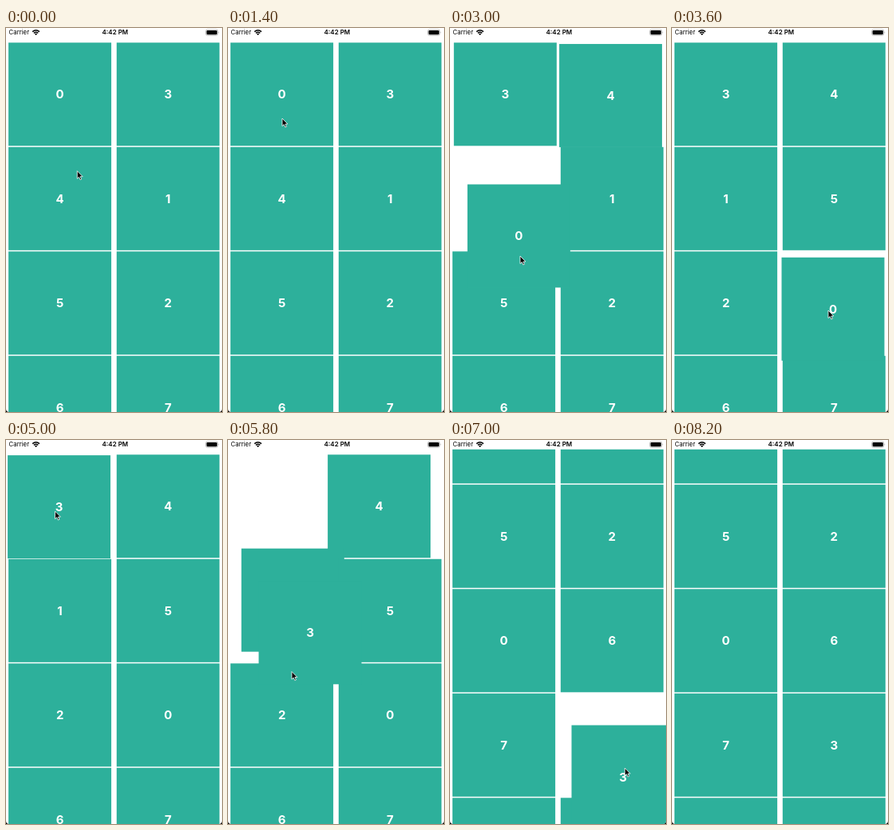
An HTML page that plays this animation: 271x480 px, repeating every 8300 ms.

```html
<!DOCTYPE html>
<html lang="en">
<head>
<meta charset="utf-8">
<title>Reorderable grid</title>
<style>
  html, body { margin: 0; width: 100%; height: 100%; overflow: hidden; background: #000; }
  svg { display: block; width: 100%; height: 100%; font-family: Inter, "Open Sans", sans-serif; }
  .cell rect { fill: #2db09b; }
  .cell text { fill: #fff; font-size: 15px; font-weight: 700; text-anchor: middle; }
  .carrier { font-size: 7.8px; }
  .clock { font-size: 8px; font-weight: 600; text-anchor: middle; }
  .arc { fill: none; stroke: #000; stroke-width: 1.4; }
</style>
</head>
<body>
<svg viewBox="0 0 271 480">
  <defs>
    <clipPath id="screen"><path d="M0 0H271V476Q271 480 267 480H4Q0 480 0 476Z"/></clipPath>
    <clipPath id="list"><rect y="11.7" width="271" height="469"/></clipPath>
  </defs>
  <g clip-path="url(#screen)">
    <rect width="271" height="480" fill="#fff"/>
    <g id="grid" clip-path="url(#list)"></g>
    <text class="carrier" x="3.6" y="8.4">Carrier</text>
    <path class="arc" d="M33.2 4.6Q37.6 .9 42 4.6M34.9 6.4Q37.6 4.2 40.3 6.4"/>
    <path d="M36 7.4Q37.6 6.2 39.2 7.4L37.6 9Z"/>
    <text class="clock" x="136.8" y="8.4">4:42 PM</text>
    <rect x="250.6" y="2" width="15.2" height="7.2" rx="2" fill="none" stroke="#999" stroke-width=".6"/>
    <rect x="251.6" y="2.9" width="13.2" height="5.4" rx="1.3"/>
    <path d="M266.6 4.5Q267.9 5.6 266.6 6.7Z" fill="#888"/>
    <path id="cursor" d="M0 0V9.6L2.2 7.6L3.8 11L5.4 10.3L3.9 7H6.9Z" stroke="#fff" stroke-width=".8"/>
  </g>
</svg>
<script>
const LOOP = 8300, STEP = 100, SHIFT = 300, LAG = 100;
const SIZE = 129, ROW = 130.5, COL = 135.7;
const LEFT = 67.6, TOP = 82.8;
const grid = document.getElementById('grid');
const cursor = document.getElementById('cursor');

// Key points of the hand: [time, x, y]
const path = [
  [0, 89.3, 178.7], [700, 45, 126], [1300, 68, 113], [1950, 68, 113],
  [2400, 77.5, 133.5], [2500, 82.5, 140], [3000, 88, 285],
  [3500, 202, 351.3], [3600, 196, 353], [4200, 61, 88], [4950, 61, 88],
  [5700, 103, 240.8], [5800, 80, 289.5], [6100, 47, 425.5], [6200, 98, 439],
  [6900, 217, 421], [7000, 219.3, 410], [7500, 285, 390]
];
const drags = [
  { item: 0, grab: 1950, drop: 3700 },
  { item: 3, grab: 4950, drop: 7150 }
];

// [time, item, new index]
const moves = [
  [2720, 0, 2], [3000, 0, 4], [3280, 0, 5],
  [5741, 3, 2], [5850, 3, 4], [6093, 3, 6], [6450, 3, 7]
];
const orders = [[0, 3, 4, 1, 5, 2, 6, 7, 8, 9]];
for (const [, item, index] of moves) {
  const next = orders[orders.length - 1].filter(n => n !== item);
  next.splice(index, 0, item);
  orders.push(next);
}

const clamp = p => Math.min(1, Math.max(0, p));
const smooth = p => (p = clamp(p), p * p * (3 - 2 * p));
const scroll = t => 93 * clamp((t - 6170) / 650);

// Monotone cubic interpolation, no overshoot at rests and turns
function along(t, k) {
  const last = path.length - 1;
  t = Math.min(Math.max(t, 0), path[last][0]);
  const slope = i => i < 0 || i >= last ? 0
    : (path[i + 1][k] - path[i][k]) / (path[i + 1][0] - path[i][0]);
  const tangent = i => {
    const a = slope(i - 1), b = slope(i);
    return a * b > 0 ? 2 * a * b / (a + b) : 0;
  };
  let i = 0;
  while (i < last - 1 && t >= path[i + 1][0]) i++;
  const span = path[i + 1][0] - path[i][0], u = (t - path[i][0]) / span, w = 1 - u;
  return path[i][k] * w * w * (1 + 2 * u) + path[i + 1][k] * u * u * (3 - 2 * u)
    + span * u * w * (tangent(i) * w - tangent(i + 1) * u);
}
const hand = t => [along(t, 1), along(t, 2)];
const mix = (a, b, p) => a.map((v, i) => v + (b[i] - v) * p);

const slot = index => [LEFT + index % 2 * COL, TOP + Math.floor(index / 2) * ROW];

// Overlapping reorders add up
function settled(item, t) {
  let [x, y] = slot(orders[0].indexOf(item));
  moves.forEach(([start], i) => {
    const p = smooth((t - start) / SHIFT);
    const a = slot(orders[i].indexOf(item)), b = slot(orders[i + 1].indexOf(item));
    x += (b[0] - a[0]) * p;
    y += (b[1] - a[1]) * p;
  });
  return [x, y - scroll(t)];
}

// A dragged cell trails the hand, then eases back into its slot
function place(item, t) {
  const home = settled(item, t);
  const drag = drags.find(d => d.item === item);
  if (!drag) return home;
  const grip = smooth((t - drag.grab) / 200) * (1 - smooth((t - drag.drop) / 250));
  return mix(home, hand(Math.min(t, drag.drop) - LAG), grip);
}

function add(parent, name, attrs) {
  const node = document.createElementNS('http://www.w3.org/2000/svg', name);
  for (const key in attrs) node.setAttribute(key, attrs[key]);
  return parent.appendChild(node);
}

const cells = orders[0].map(item => {
  const node = add(grid, 'g', { class: 'cell' });
  add(node, 'rect', { x: -SIZE / 2, y: -SIZE / 2, width: SIZE, height: SIZE });
  add(node, 'text', { y: 5.5 }).textContent = item;
  return node;
});

const moveTo = (node, [x, y]) =>
  node.setAttribute('transform', `translate(${x.toFixed(2)} ${y.toFixed(2)})`);

function draw(t) {
  cells.forEach((node, i) => moveTo(node, place(orders[0][i], t)));
  const front = cells[orders[0].indexOf(drags[t < 4500 ? 0 : 1].item)];
  if (grid.lastChild !== front) grid.appendChild(front);
  moveTo(cursor, hand(t));
}

const begin = performance.now();
function tick() {
  const t = performance.now() - begin;
  draw(Math.floor((t + 5) / STEP) * STEP % LOOP);
  requestAnimationFrame(tick);
}
tick();
</script>
</body>
</html>
```
